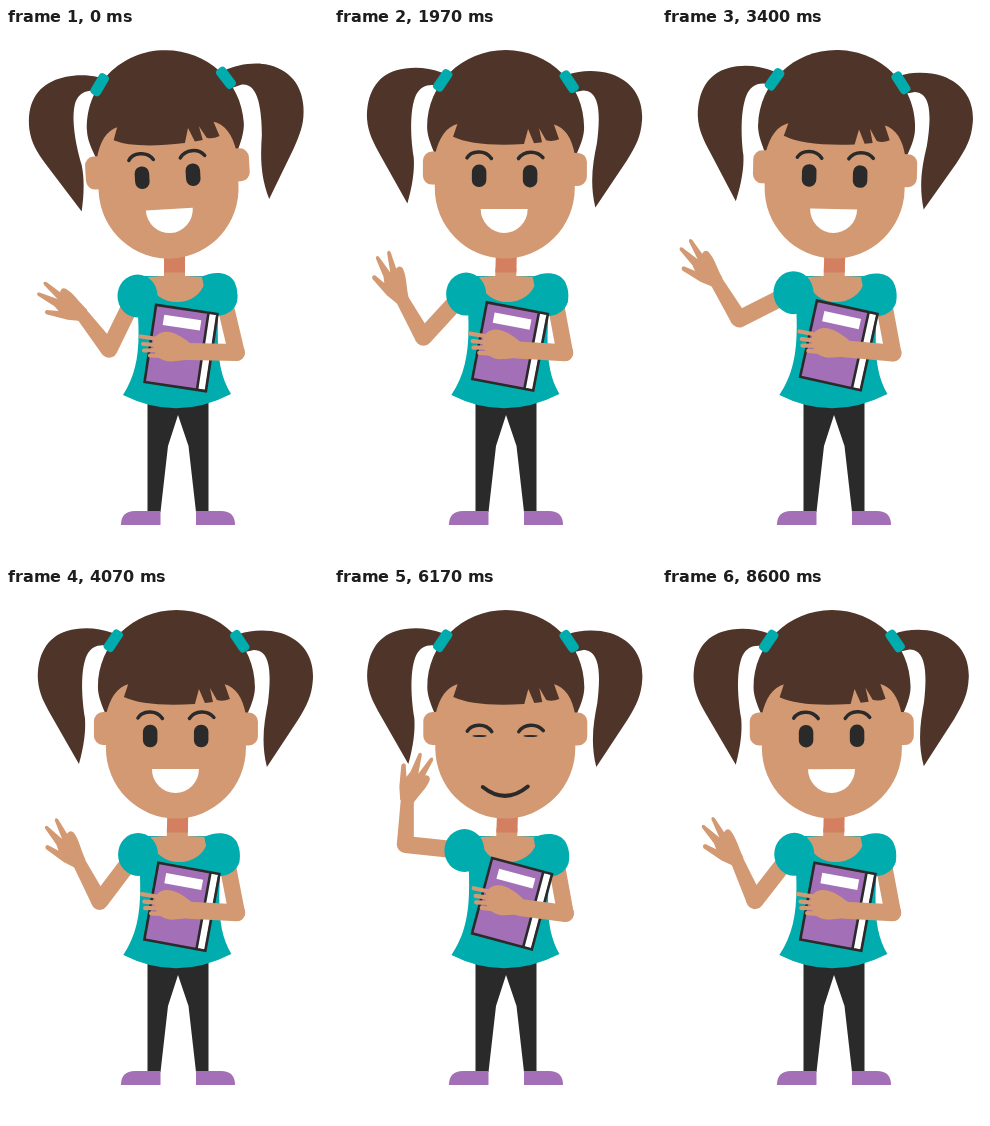
These frames come from a looping animation (322x532 px, 8630 ms). An HTML page:

```html
<!DOCTYPE html>
<html lang="en">
<head>
<meta charset="utf-8">
<title>Waving student</title>
<style>
  html, body { margin: 0; width: 100%; height: 100%; overflow: hidden; background: #fff; }
  svg { display: block; width: 322px; height: 532px; }
  .skin { fill: #d39973; }
  .hair { fill: #4f3529; }
  .teal { fill: #00acad; }
  .dark { fill: #2a2a2a; }
  .purple { fill: #a36fb6; }
  .white { fill: #fff; }
  .limb { fill: none; stroke: #d39973; stroke-linecap: round; stroke-linejoin: round; }
  .ink { fill: none; stroke: #2a2a2a; stroke-linecap: round; }
</style>
</head>
<body>
<svg viewBox="0 0 322 532">
  <path class="dark" d="M141.5 374H202.5V484H190L182.5 418L172 387L162 418L154.5 484H141.5Z"/>
  <path class="purple" d="M115 497Q115 483 129 483H154.5V497ZM229 497Q229 483 215 483H190V497Z"/>

  <g id="torso">
    <path class="teal" d="M130 248H212V290C211 325 213 346 225 366Q171 394 117 367C131 345 134 322 132 288Z"/>
    <path class="skin" d="M142 249L158 248V240H179V248L200 249C198 265 186 274 171 274S144 265 142 249Z"/>
    <rect x="158" y="222" width="21" height="22.5" fill="#d48060"/>
  </g>

  <g id="head">
    <path id="tailL" class="hair" d="M108 45C92 39 75 39 62 43C42 49 32 67 33 92C34 106 40 116 46 127L74 176C79 158 81 143 80 130C76 105 76 80 82 67C87 58 94 56 104 58Z"/>
    <path id="tailR" class="hair" d="M234 46C246 42 262 41 276 45C300 53 309 71 308 91C307 108 302 117 293 132L262 179C256 155 259 135 263 115C266 90 267 62 249 62L240 64Z"/>
    <path class="hair" d="M101 127C95 113 93 106 93 99C93 56 128 22 171.5 22S250 56 250 99C250 106 248 114 242 127Z"/>
    <rect class="skin" x="89" y="124" width="26" height="33" rx="9"/>
    <rect class="skin" x="227" y="124.5" width="26" height="33" rx="9"/>
    <path class="skin" d="M101 127C105 110 112 99 124 96H219C231 99 238 110 241 127V160A70 70.5 0 0 1 101 160Z"/>
    <path class="hair" d="M124 94L119 109Q140 119 190 116L194 101L200 115L208 114L205 100L212 112Q218 114 225 111L219 94Z"/>
    <rect class="teal" x="103" y="41" width="11" height="23.5" rx="4" transform="rotate(34 108.5 52.5)"/>
    <rect class="teal" x="229.5" y="41.5" width="11" height="23.5" rx="4" transform="rotate(-34 235 53.5)"/>
    <path id="brows" class="ink" stroke-width="3.5" d="M133 130C137 123 151 121 157.5 130.5M184.5 130.5C190 122 203 122 209 129.5"/>
    <rect id="eyeL" class="dark" x="138" width="14.5"/>
    <rect id="eyeR" class="dark" x="189" width="14.5"/>
    <path id="grin" class="white" d="M147 181H194A23.5 24 0 0 1 147 181Z"/>
    <path id="smile" class="ink" stroke-width="4" d="M148.5 199Q171 217 193.5 198.5"/>
  </g>

  <path id="upper" class="limb" stroke-width="17"/>
  <path id="fore" class="skin"/>
  <path id="hand" class="skin" d="M-6.5 3L-12 -9L-18 -30Q-17 -34 -14 -32L-9 -21L-7 -27L-6 -47Q-4 -50 -2.5 -47L1 -28L6.5 -47Q9 -50 10 -46L8 -29Q13 -31 14 -26C14 -17 9 -8 6.5 3Z"/>
  <ellipse id="sleeveL" class="teal" rx="20" ry="21.5"/>

  <path id="armR" class="limb" stroke-width="16.5"/>
  <path id="sleeveR" class="teal" d="M196 249C206 243 222 243 228 253Q233 262 231 274Q227 286 212 288L202 280Z"/>
  <g id="book">
    <rect class="purple" x="-31" y="-39" width="62" height="78"/>
    <rect class="white" x="22" y="-38" width="8" height="76"/>
    <path class="ink" stroke-width="2.6" d="M-31 -39H31V39H-31ZM22 -39V39"/>
    <rect class="white" x="-21.5" y="-30.5" width="37.5" height="10.5"/>
  </g>
  <path id="foreR" class="limb" stroke-width="17"/>
  <g id="grip">
    <path class="skin" d="M184 315C175 308 166 303 158 304C151 305 147 310 147 316C147 327 154 333 164 333.5C173 333 178 332 184 331.5Z"/>
    <path class="limb" stroke-width="4.2" d="M152 311L134.5 308.5M151 317L137 316M152 322L138 322.5M155 328L144 327.5"/>
  </g>
</svg>
<script>
const LOOP = 8630;
const $ = id => document.getElementById(id);
const set = (id, attrs) => {
  for (const name in attrs) $(id).setAttribute(name, attrs[name]);
};

// time, head tilt
const TILT = [
  [0, -3.4], [700, 4], [1130, 2.2], [1700, -.5], [2770, 3.9], [3350, 1.5],
  [4070, 0], [4450, 2], [4950, -2], [5600, 2.5], [6170, 0], [6780, 1.5],
  [7270, 0], [7700, 2], [8150, -1], [8600, -.3]
];

// time, upper arm, forearm, hand
const WAVE = [
  [0,    26, 38, 60],
  [700,  31, 30, 25],
  [1130, 34, 24, 14],
  [1500, 35, 28, 38],
  [1900, 38, 28, 22],
  [2250, 70, 33, 48],
  [2580, 97, 3,  12],
  [2770, 99, -5, -16],
  [3020, 97, 2,  14],
  [3350, 68, 30, 44],
  [3700, 38, 26, 15],
  [4070, 37, 28, 38],
  [4450, 34, 28, 18],
  [4950, 31, 34, 50],
  [5400, 37, 28, 20],
  [5720, 70, 34, 48],
  [6170, 96, -2.5, -21],
  [6450, 95, 3,  12],
  [6780, 66, 34, 48],
  [7270, 26, 33, 37],
  [7700, 28, 32, 18],
  [8150, 33, 30, 48],
  [8600, 38, 24, 40]
];
const BLINKS = [2705, 6170];
const CLOSED = [5200, 7800];

// Smooth curve through the rows of a table
function sample(rows, t) {
  const last = rows.length - 1;
  t = Math.min(t, rows[last][0]);
  let i = 0;
  while (i < last - 1 && rows[i + 1][0] <= t) i++;
  const slope = (j, c) => j > 0 && j < last
    ? (rows[j + 1][c] - rows[j - 1][c]) / (rows[j + 1][0] - rows[j - 1][0]) : 0;
  const a = rows[i], b = rows[i + 1], d = b[0] - a[0], u = (t - a[0]) / d;
  const ease = u * u * (3 - 2 * u);
  return a.map((v, c) => v + (b[c] - v) * ease
    + d * u * (1 - u) * ((1 - u) * slope(i, c) - u * slope(i + 1, c))).slice(1);
}

const clamp = (v, min, max) => Math.max(min, Math.min(max, v));

function blink(t) {
  const gap = Math.min(...BLINKS.map(b => Math.abs(t - b)));
  return clamp(1.2 - gap / 108, 0, .94);
}

// Point at a distance, the angle measured from straight up towards the left
const reach = ([x, y], deg, len) => {
  const a = deg * Math.PI / 180;
  return [x - Math.sin(a) * len, y - Math.cos(a) * len];
};

function drawHead(t, sway, tilt) {
  const k = blink(t), h = 22.5 - 22 * k;
  const closed = t >= CLOSED[0] && t < CLOSED[1];
  const tail = tilt * (tilt < 0 ? 1.2 : .5);
  set('head', { transform: `translate(${sway - 3.7} 0) rotate(${tilt} 171 240)` });
  set('tailL', { transform: `rotate(${tail} 108 52)` });
  set('tailR', { transform: `rotate(${tail} 235 54)` });
  set('brows', { transform: `translate(0 ${14 * k})` });
  for (const id of ['eyeL', 'eyeR']) {
    set(id, { y: 148 - h / 2, height: h, rx: 7, ry: Math.min(7, h / 2) });
  }
  set('grin', { visibility: closed ? 'hidden' : 'visible' });
  set('smile', { visibility: closed ? 'visible' : 'hidden' });
}

function drawWave(lift, sway, up, fore, hand) {
  const shoulder = [128, 270 - 7.5 * lift];
  const elbow = reach(shoulder, 180 - up, 57);
  const wrist = reach(elbow, fore, 45);
  const side = (p, r) => [reach(p, fore + 90, r), reach(p, fore - 90, r)];
  const [e1, e2] = side(elbow, 8.5), [w1, w2] = side(wrist, 6.5);
  set('upper', { d: `M${shoulder}L${elbow}` });
  set('fore', { d: `M${e1}L${w1}L${w2}L${e2}Z` });
  set('hand', { transform: `translate(${wrist}) rotate(${-hand})` });
  set('sleeveL', { cx: 131.5 + .6 * sway - 3.5 * lift, cy: 268 - 5.5 * lift });
}

function drawHold(lift, sway) {
  const elbow = [230.5 + lift, 324.5 + lift];
  set('sleeveR', { transform: `translate(${sway * .9} ${lift})` });
  set('armR', { d: `M${220 + sway * .8} 280L${elbow}` });
  set('book', { transform: `translate(${175 + 3 * lift} ${320 - 4.3 * lift}) rotate(${8.5 + 6.5 * lift})` });
  set('foreR', { d: `M${elbow}L${182 + 4 * lift} ${323.5 - 4 * lift}` });
  set('grip', { transform: `translate(${4 * lift} ${-5 * lift}) rotate(${4 * lift} 182 323)` });
}

function draw(t) {
  const [tilt] = sample(TILT, t);
  const [up, fore, hand] = sample(WAVE, t);
  // The body follows the raised arm
  const low = clamp((up - 26) / 12, 0, 1), high = clamp((up - 38) / 58, 0, 1);
  const lift = .3 * Math.sqrt(low) + .7 * high;
  const sway = 3 * low ** 1.5 + high;
  const lean = sway / 125;
  set('torso', { transform: `matrix(1 0 ${-lean} 1 ${lean * 381} 0)` });
  drawHead(t, sway, tilt);
  drawWave(lift, sway, up, fore, hand);
  drawHold(lift, sway);
}

const start = performance.now();
function tick() {
  draw((performance.now() - start) % LOOP);
  requestAnimationFrame(tick);
}
tick();
</script>
</body>
</html>
```
